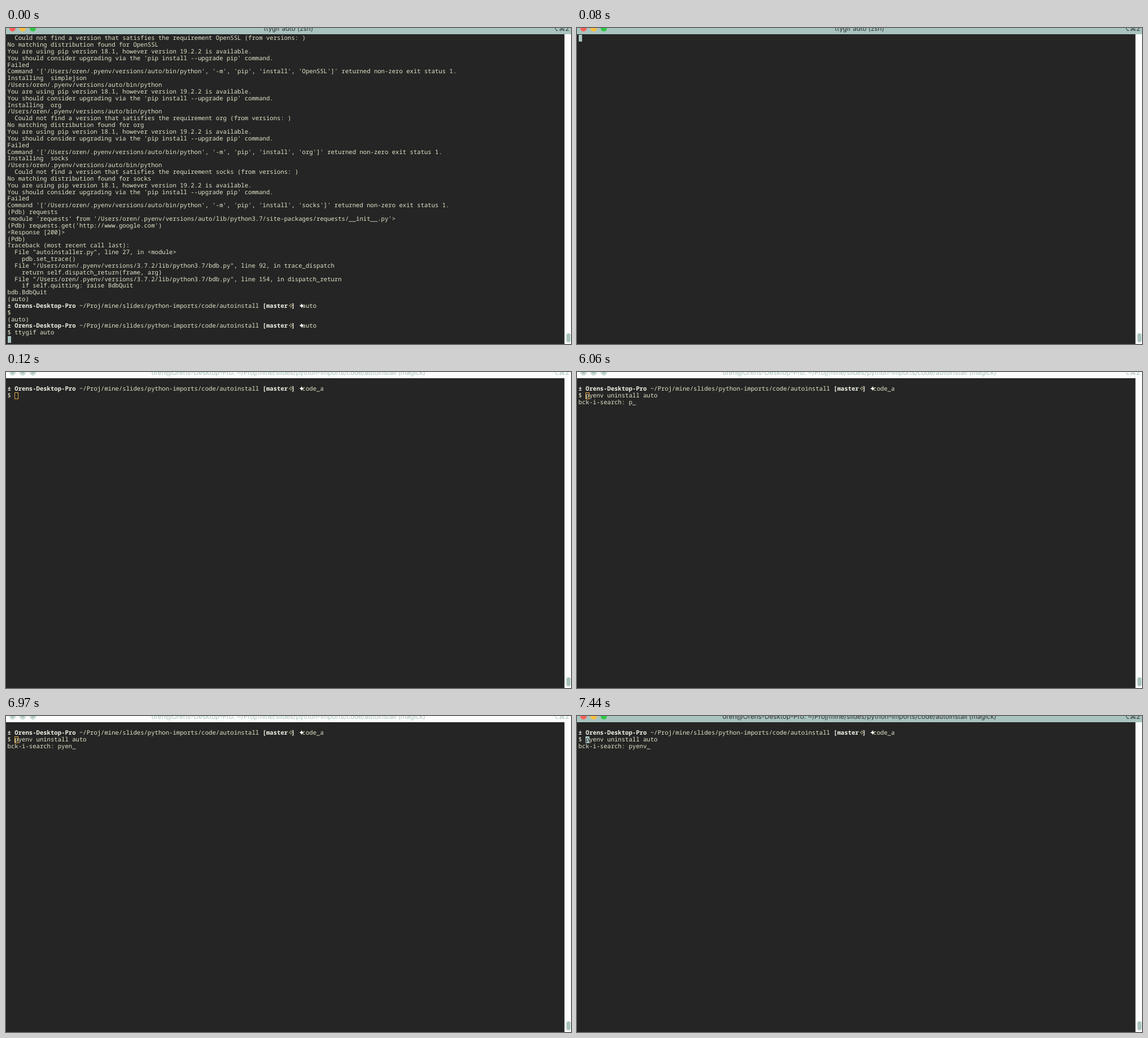
These frames come from a looping animation (1001x559 px, 8 s). An HTML page:

```html
<!DOCTYPE html>
<html lang="en">
<head>
<meta charset="utf-8">
<title>Terminal session</title>
<style>
  :root { --fg: #e4e6ca; --teal: #a9c4bf; --dark: #252525; --row: 11.84px; --loop: 8s step-end infinite; }
  html, body { margin: 0; width: 100%; height: 100%; overflow: hidden; background: var(--dark); }
  #stage { position: relative; width: 1001px; height: 559px; overflow: hidden; background: var(--dark);
    text-rendering: geometricPrecision; }
  #stage div, pre { position: absolute; }

  .bar { left: 0; top: 0; width: 1001px; height: 11px; overflow: hidden; background: var(--teal); color: #303432;
    font: 11.7px/14px Inter, "Liberation Sans", sans-serif; white-space: nowrap; animation: blur-bar var(--loop); }
  .title { left: 0; width: 1001px; top: -6px; text-align: center; }
  .hint { right: 3px; top: -6px; font-family: Inter, "DejaVu Sans", sans-serif; }
  .light { top: -5.5px; width: 11px; height: 11px; border-radius: 50%; }
  .idle { box-sizing: border-box; border: 1px solid #adc5c1;
    background: radial-gradient(#a9c4bf 2px, #dfe8e6 4px); }

  .track { box-sizing: border-box; right: 0; top: 11px; width: 12px; height: 548px;
    background: #fbfcfb; border-left: 1px solid #a0a2a0; }
  .thumb { left: 3px; top: 529px; width: 7px; height: 16px; border-radius: 4px; background: var(--teal); }

  pre { left: 2.6px; top: 13.2px; margin: 0; color: var(--fg);
    font: 10.617px/var(--row) "Noto Sans Mono", "DejaVu Sans Mono", monospace; font-variant-ligatures: none; }
  b { color: #eff5e6; }
  i { display: inline-block; width: 1ch; height: var(--row); vertical-align: top; color: #fff;
    font: inherit; }
  i::before { content: attr(data-star); font: 13px/12px "DejaVu Sans", sans-serif; }
  i.open { color: #f3dfae; }
  .query { display: inline-block; height: var(--row); overflow: hidden; vertical-align: top; }
  .cursor { box-sizing: border-box; width: 6.4px; height: 12px; }
  .block { background: var(--teal); color: var(--dark); }
  .outline { border: 1px solid #dda447; }
  .match { left: 2ch; top: 34.8px; height: 1px; background: #d0a552; }
  .query, .match { animation: type var(--loop); }

  .log { animation: log var(--loop); }
  .clear { animation: clear var(--loop); }
  .before { animation: before var(--loop); }
  .session { animation: session var(--loop); }
  .focused { animation: focused var(--loop); }
  .blurred { animation: blurred var(--loop); }
  .search { animation: search var(--loop); }
  .found { animation: found var(--loop); }
  .refocus { animation: refocus var(--loop); }

  @keyframes log { 0% { visibility: visible } 1%, 100% { visibility: hidden } }
  @keyframes clear { 0% { visibility: hidden } 1% { visibility: visible } 1.5%, 100% { visibility: hidden } }
  @keyframes before { 0% { visibility: visible } 1.5%, 100% { visibility: hidden } }
  @keyframes session { 0% { visibility: hidden } 1.5%, 100% { visibility: visible } }
  @keyframes focused { 0% { visibility: visible } 1.5% { visibility: hidden } 93%, 100% { visibility: visible } }
  @keyframes blurred { 0% { visibility: hidden } 1.5% { visibility: visible } 93%, 100% { visibility: hidden } }
  @keyframes search { 0% { visibility: hidden } 71.875%, 100% { visibility: visible } }
  @keyframes found { 0% { visibility: hidden } 75.75%, 100% { visibility: visible } }
  @keyframes refocus { 0% { visibility: hidden } 93%, 100% { visibility: visible } }
  @keyframes blur-bar {
    0% { background: var(--teal); color: #303432 }
    1.5% { background: #fbfcfb; color: var(--teal) }
    93%, 100% { background: var(--teal); color: #303432 }
  }
  @keyframes type {
    0% { width: 0 } 75.75% { width: 1ch } 83.875% { width: 2ch }
    85.75% { width: 3ch } 87.125% { width: 4ch } 93%, 100% { width: 5ch }
  }
</style>
</head>
<body>
<div id="stage">
  <div class="bar">
    <div class="light focused" style="left:5.5px;background:#fc5f57"></div>
    <div class="light focused" style="left:23.5px;background:#fdbe3c"></div>
    <div class="light focused" style="left:41.5px;background:#2dc944"></div>
    <div class="light idle blurred" style="left:5.5px"></div>
    <div class="light idle blurred" style="left:23.5px"></div>
    <div class="light idle blurred" style="left:41.5px"></div>
    <div class="title before">ttygif auto (zsh)</div>
    <div class="title session">oren@Orens-Desktop-Pro: ~/Proj/mine/slides/python-imports/code/autoinstall (magick)</div>
    <div class="hint">⌥⌘2</div>
  </div>

<pre class="log">  Could not find a version that satisfies the requirement OpenSSL (from versions: )
No matching distribution found for OpenSSL
You are using pip version 18.1, however version 19.2.2 is available.
You should consider upgrading via the 'pip install --upgrade pip' command.
Failed
Command '['/Users/oren/.pyenv/versions/auto/bin/python', '-m', 'pip', 'install', 'OpenSSL']' returned non-zero exit status 1.
Installing  simplejson
/Users/oren/.pyenv/versions/auto/bin/python
You are using pip version 18.1, however version 19.2.2 is available.
You should consider upgrading via the 'pip install --upgrade pip' command.
Installing  org
/Users/oren/.pyenv/versions/auto/bin/python
  Could not find a version that satisfies the requirement org (from versions: )
No matching distribution found for org
You are using pip version 18.1, however version 19.2.2 is available.
You should consider upgrading via the 'pip install --upgrade pip' command.
Failed
Command '['/Users/oren/.pyenv/versions/auto/bin/python', '-m', 'pip', 'install', 'org']' returned non-zero exit status 1.
Installing  socks
/Users/oren/.pyenv/versions/auto/bin/python
  Could not find a version that satisfies the requirement socks (from versions: )
No matching distribution found for socks
You are using pip version 18.1, however version 19.2.2 is available.
You should consider upgrading via the 'pip install --upgrade pip' command.
Failed
Command '['/Users/oren/.pyenv/versions/auto/bin/python', '-m', 'pip', 'install', 'socks']' returned non-zero exit status 1.
(Pdb) requests
&lt;module 'requests' from '/Users/oren/.pyenv/versions/auto/lib/python3.7/site-packages/requests/__init__.py'&gt;
(Pdb) requests.get('http://www.google.com')
&lt;Response [200]&gt;
(Pdb)
Traceback (most recent call last):
  File "autoinstaller.py", line 27, in &lt;module&gt;
    pdb.set_trace()
  File "/Users/oren/.pyenv/versions/3.7.2/lib/python3.7/bdb.py", line 92, in trace_dispatch
    return self.dispatch_return(frame, arg)
  File "/Users/oren/.pyenv/versions/3.7.2/lib/python3.7/bdb.py", line 154, in dispatch_return
    if self.quitting: raise BdbQuit
bdb.BdbQuit
(auto)
<b>± Orens-Desktop-Pro</b> ~/Proj/mine/slides/python-imports/code/autoinstall <b>[master<i class="open" data-star="✧"></i>]</b> <i data-star="✦"></i>auto
$
(auto)
<b>± Orens-Desktop-Pro</b> ~/Proj/mine/slides/python-imports/code/autoinstall <b>[master<i class="open" data-star="✧"></i>]</b> <i data-star="✦"></i>auto
$ ttygif auto
<div class="cursor block" style="left:0;top:531.8px"></div></pre>

<pre class="clear"><div class="cursor block" style="left:0;top:-1.2px"></div></pre>

<pre class="session">
&nbsp;
<b>± Orens-Desktop-Pro</b> ~/Proj/mine/slides/python-imports/code/autoinstall <b>[master<i class="open" data-star="✧"></i>]</b> <i data-star="✦"></i>code_a
$ <span class="found">pyenv uninstall auto</span>
<span class="search">bck-i-search: <span class="query">pyenv</span>_</span><div class="match found"></div><div class="cursor outline blurred" style="left:2ch;top:22.8px"></div><div class="cursor block refocus" style="left:2ch;top:22.8px;line-height:12px">p</div></pre>

  <div class="track"><div class="thumb"></div></div>
</div>
</body>
</html>
```
